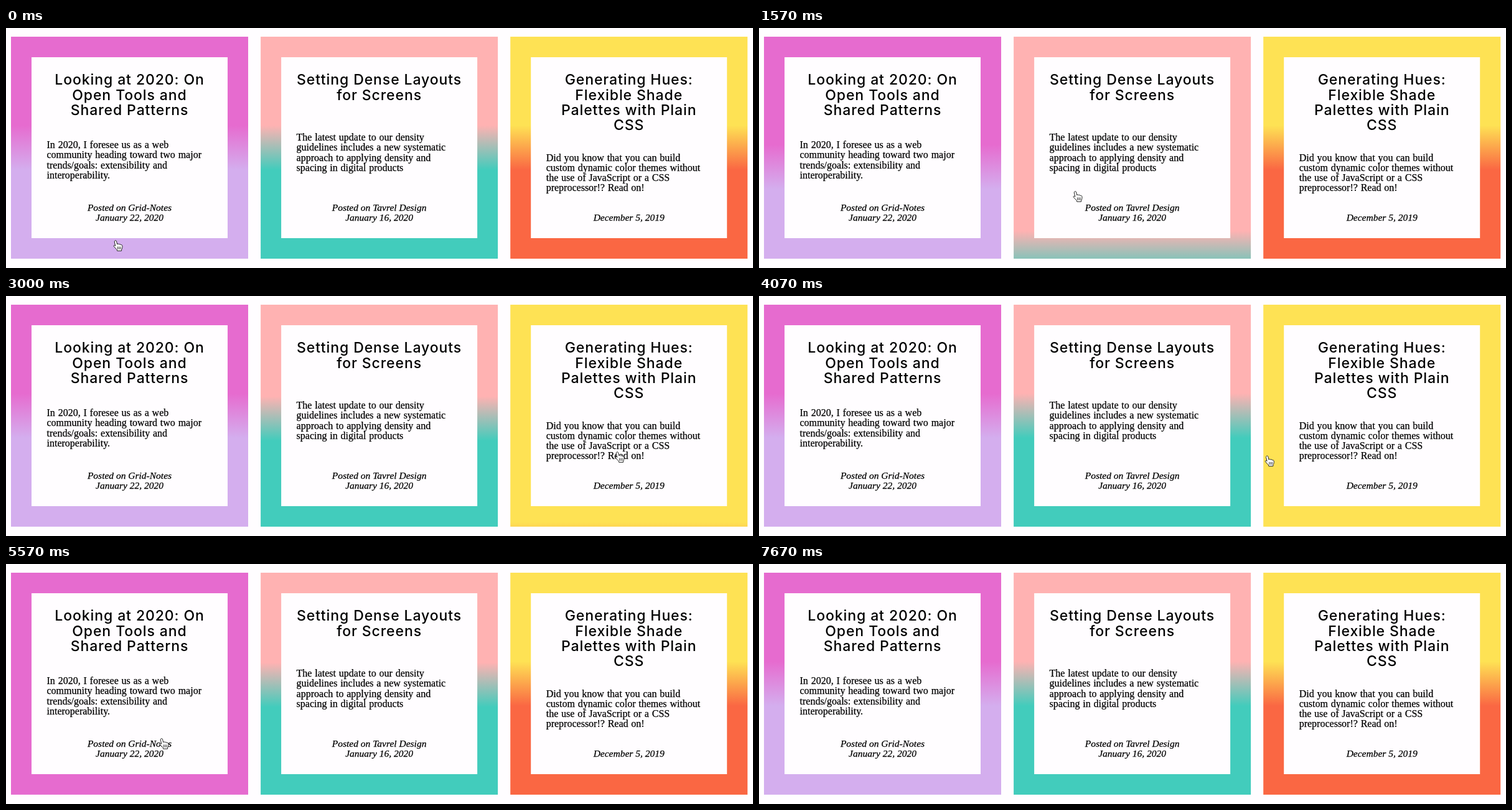
Animation of 1200 by 386 pixels, one loop 7.71 s. Source, as an HTML page:

```html
<!DOCTYPE html>
<html lang="en">
<head>
<meta charset="utf-8">
<title>Article cards</title>
<style>
  html, body { margin: 0; width: 100%; height: 100%; overflow: hidden; background: #fffdff; }
  svg { display: block; width: 1200px; height: 386px; }
  .title { font: 500 23px Inter, sans-serif; letter-spacing: .9px; text-anchor: middle; }
  .body { font: 16px "Liberation Serif", serif; word-spacing: .8px; }
  .meta { font: italic 15.5px "Liberation Serif", serif; text-anchor: middle; }
  .body, .meta { stroke: #000; stroke-width: .25px; }
</style>
</head>
<body>
<svg id="stage" viewBox="0 0 1200 386"></svg>
<script>
const LOOP = 7710, FADE = 500, TRAVEL = 214;

// hover: [enter, leave] times in ms
const cards = [
  {
    x: 8, colors: ['#e66bcf', '#d4aeee'], bodyY: 193, metaY: 293.5,
    title: ['Looking at 2020: On', 'Open Tools and', 'Shared Patterns'],
    body: ['In 2020, I foresee us as a web', 'community heading toward two major',
           'trends/goals: extensibility and', 'interoperability.'],
    meta: ['Posted on Grid-Notes', 'January 22, 2020'],
    hover: [[0, 1290], [5150, 6185]]
  },
  {
    x: 409.1, colors: ['#ffb2b2', '#42ccbc'], bodyY: 181, metaY: 293.5,
    title: ['Setting Dense Layouts', 'for Screens'],
    body: ['The latest update to our density', 'guidelines includes a new systematic',
           'approach to applying density and', 'spacing in digital products'],
    meta: ['Posted on Tavrel Design', 'January 16, 2020'],
    hover: [[1325, 2595], [4120, 5131]]
  },
  {
    x: 810.2, colors: ['#fee254', '#fa6743'], bodyY: 213.5, metaY: 309.8,
    title: ['Generating Hues:', 'Flexible Shade', 'Palettes with Plain', 'CSS'],
    body: ['Did you know that you can build', 'custom dynamic color themes without',
           'the use of JavaScript or a CSS', 'preprocessor!? Read on!'],
    meta: ['December 5, 2019'],
    hover: [[2615, 4080]]
  }
];

// pointer tip: [ms, x, y]
const path = [
  [0, 176, 342], [500, 192, 262], [950, 193, 260], [1305, 399, 266], [1650, 541, 262],
  [2250, 541, 262], [2605, 800, 256], [3000, 982, 251], [3200, 990, 250], [3750, 990, 250],
  [4100, 800, 258], [4350, 640, 268], [4850, 600, 270], [5140, 398, 274], [5200, 312, 275],
  [5500, 250, 280], [5900, 250, 285], [6185, 262, 371], [6260, 266, 392]
];

const lines = (cls, list, x, y, step) => list.map((s, i) =>
  `<text class="${cls}" x="${x}" y="${y + i * step}">${s}</text>`).join('');

const drawCard = (c, i) => `
  <linearGradient id="g${i}" gradientUnits="userSpaceOnUse" x1="0" x2="0">
    <stop stop-color="${c.colors[0]}"/><stop offset="1" stop-color="${c.colors[1]}"/>
  </linearGradient>
  <rect x="${c.x}" y="14" width="381" height="357" fill="url(#g${i})"/>
  <rect x="${c.x + 33}" y="47" width="315" height="291" fill="#fffdff"/>
  ${lines('title', c.title, c.x + 190.5, 91.2, 24.4)}
  ${lines('body', c.body, c.x + 57.5, c.bodyY, 16.3)}
  ${lines('meta', c.meta, c.x + 190.5, c.metaY, 16.3)}`;

const stage = document.getElementById('stage');
stage.innerHTML = cards.map(drawCard).join('') + `
  <g id="hand" fill="#fff" stroke="#222" stroke-linejoin="round" stroke-linecap="round">
    <path d="M-1.8 1.6C-1.8-.6 1-.8 1.5 1L2.7 6C3.3 4.7 5.2 4.8 5.6 6.2
      C6.4 5.2 8 5.5 8.3 6.9C9.4 6.2 10.8 6.9 10.9 8.4C11.1 11 10.5 12.8 9.7 14.2
      L9.5 16.4H2.6L2.2 14.6C.4 12.8-1.1 10.9-2.8 9.2C-3.6 7.5-1.8 6.8-.5 8.2Z"/>
    <path d="M3.5 10V13.7M5.8 10V13.7M8 10V13.7" stroke-width=".9"/>
  </g>`;
const hand = document.getElementById('hand');
const grads = cards.map((c, i) => document.getElementById('g' + i));

// cubic-bezier(.25, .1, .25, 1)
function ease(x) {
  if (x <= 0) return 0;
  if (x >= 1) return 1;
  let lo = 0, hi = 1, u;
  for (let i = 0; i < 20; i++) {
    u = (lo + hi) / 2;
    if (.75 * u * (1 - u) + u ** 3 < x) lo = u; else hi = u;
  }
  return .3 * u * (1 - u) ** 2 + 3 * u * u * (1 - u) + u ** 3;
}

function pointerAt(t) {
  const i = path.findIndex(p => p[0] > t);
  if (i < 0) return null;
  const [t0, x0, y0] = path[i - 1], [t1, x1, y1] = path[i];
  const k = (t - t0) / (t1 - t0);
  return [x0 + (x1 - x0) * k, y0 + (y1 - y0) * k];
}

function draw(now) {
  const t = now % LOOP;
  cards.forEach((c, i) => {
    const shift = TRAVEL * c.hover.reduce((sum, [a, b]) =>
      sum + ease((t - a) / FADE) - ease((t - b) / FADE), 0);
    grads[i].setAttribute('y1', 156.8 + shift);
    grads[i].setAttribute('y2', 228.2 + shift);
  });
  const p = pointerAt(t);
  hand.setAttribute('visibility', p ? 'visible' : 'hidden');
  if (p) hand.setAttribute('transform', `translate(${p})`);
}

let start;
function tick(now) {
  start ??= now;
  draw(now - start);
  requestAnimationFrame(tick);
}
draw(0);
requestAnimationFrame(tick);
</script>
</body>
</html>
```
